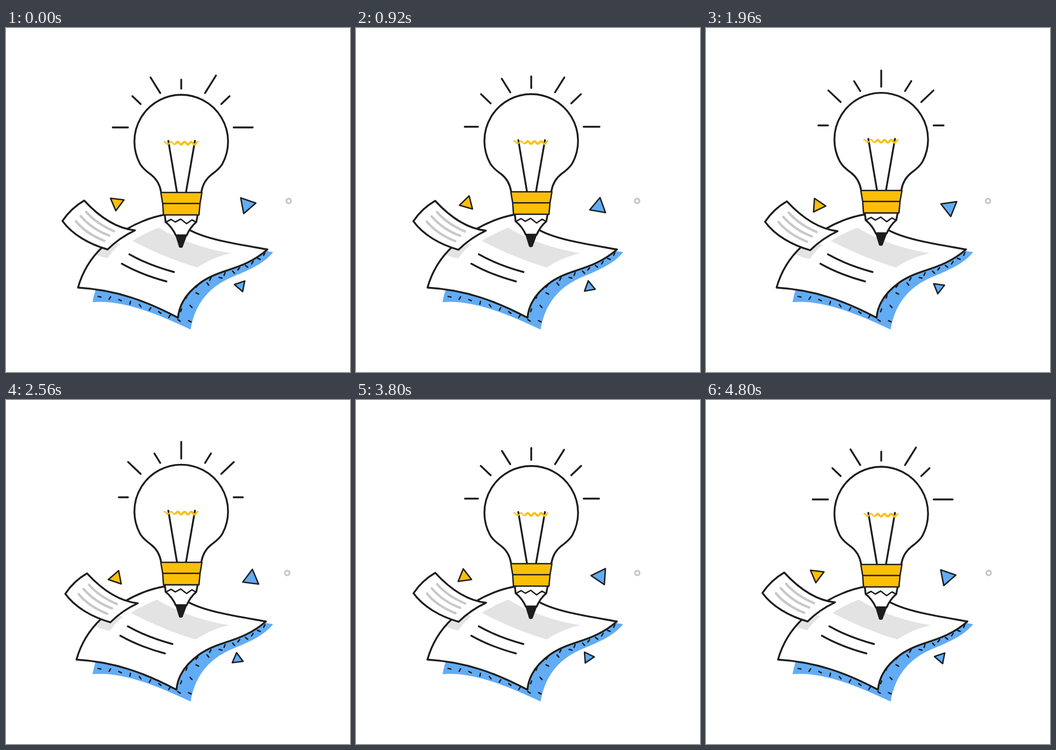
Write an HTML page that moves like this. It is 640x640 px and loops after 4840 ms.

```html
<!DOCTYPE html>
<html lang="en">
<head>
<meta charset="utf-8">
<title>Bright idea</title>
<style>
  html, body { margin: 0; width: 100%; height: 100%; overflow: hidden; background: #fff; }
  svg { display: block; width: 100%; height: 100%; }
  .line { fill: none; stroke: #1d1d1d; stroke-width: 3.4; stroke-linecap: round; stroke-linejoin: round; }
  .white { fill: #fff; }
  .thin { stroke-width: 2.6; }
  .blue { fill: #62acf5; }
  .gold { fill: #fbbf07; }
  .shade { fill: #e3e3e3; }
  .grey { fill: none; stroke: #c8c8c8; stroke-width: 4.4; stroke-linecap: round; }
  .glow { fill: none; stroke: #fbbf07; stroke-linecap: round; stroke-linejoin: round; }
</style>
</head>
<body>
<svg viewBox="0 0 640 640">
  <defs>
    <path id="sheet" d="M134 483C144 447 162 424 180 407C197 391 240 357 297 347C308 358 325 370 342 376C375 394 430 402 486.5 412C440 452 400 447 363 473C335 493 322 515 320 539C263 509 206 487 134 483Z"/>
    <clipPath id="inside"><use href="#sheet"/></clipPath>
    <path id="glass" d="M288.5 305C286 290 279 280 270 273C261 266.5 253.5 260.5 249 252A87 87 0 0 1 326 124.3"/>
    <path id="text" d="M229.5 421C255 435.5 283 446 312.5 454"/>
  </defs>

  <path class="blue" d="M169 480C166 489 163 499 161 510C220 505 285 534 343.5 561C352 508 383 478 425 461.5C456 448.5 481 437 497 417L478 414L320 480Z"/>
  <g id="dashes" class="line thin"></g>

  <g id="paper">
    <use href="#sheet" class="white"/>
    <path class="shade" d="M235 396C250 387 267 378 284 371.5C325 396 370 411 419 419C395 424 375 433 356 445.5C310 432 270 414 235 396Z"/>
    <g clip-path="url(#inside)">
      <path id="cast" class="shade" d="M156 416C168 423 179 427 189.5 428C196 417 203 410 213 402L190 395Z"/>
    </g>
    <use href="#sheet" class="line"/>
    <use href="#text" class="line"/>
    <use href="#text" class="line" x="-14" y="17.5"/>
  </g>

  <g id="note">
    <path class="line white" d="M145.5 321C130 330 115 344 105 359C123 384 155 402.500 189 412C204 397 221 385.500 240 376.500C202 372.500 170 347.500 145.500 321Z"/>
    <path class="grey" d="M149 342C163 358 182 370 201 378M139 350C155 368 172 379 192 386M130 359.500C145 378 163 388 183 396"/>
  </g>

  <g id="bulb">
    <path class="line white" d="M295.500 348L297 361C304.500 367 311 374.500 316 386H336C341 374.500 347 367 354 361L356.500 348"/>
    <path class="line thin" d="M297 361.500L307 356L315 361L325 355.500L336 364L346 357L354 361.500"/>
    <path fill="#1d1d1d" d="M314.500 384H337.500L328.500 408Q325.500 410 322 408Z"/>
    <use href="#glass" class="line white"/>
    <use href="#glass" class="line white" transform="matrix(-1 0 0 1 652 0)"/>
    <path class="line" d="M302 210L318 305M351.500 210L335 305"/>
    <path id="coil" class="glow" stroke-width="2.400"/>
    <path id="coilThick" class="glow" stroke-width="3.800"/>
    <path class="line thin gold" d="M288 306H364.500L361 326.500H291.500ZM291.500 326.500H361L359 347.800H293Z"/>
  </g>

  <g id="rays" class="line"></g>
  <g id="bits"></g>
  <circle id="ring" cy="321.800" r="4.300" fill="none" stroke="#c8c8c8" stroke-width="3.400"/>
</svg>
<script>
const $ = id => document.getElementById(id);
const STEP = 40, LOOP = 4840, TURN = 4800, RAD = Math.PI / 180;

const make = (tag, attrs) => {
  const el = document.createElementNS('http://www.w3.org/2000/svg', tag);
  for (const k in attrs) el.setAttribute(k, attrs[k]);
  return el;
};
const add = (id, tag, attrs) => $(id).appendChild(make(tag, attrs));
const move = (el, x, y, turn = 0) =>
  el.setAttribute('transform', `translate(${x} ${y}) rotate(${turn})`);

// Scatter short dashes along a guide, off to alternate sides by up to `spread`
let seed = 11;
const random = () => (seed = seed * 16807 % 2147483647) / 2147483647;

function scatter(d, count, spread) {
  const guide = make('path', { d }), length = guide.getTotalLength();
  for (let i = 0; i < count; i++) {
    const u = i / (count - 1);
    const p = guide.getPointAtLength(u * length);
    const off = (i % 2 ? -1 : 1) * spread * (1 - u) ** 1.5;
    const tilt = (i % 2 ? -55 : 35) + 50 * (random() - 0.5);
    const dash = add('dashes', 'path', { d: 'M-2.7 0H2.7' });
    move(dash, p.x + off, p.y + off * 0.4, tilt);
  }
}
scatter('M174 500C215 503 280 525 322 544', 9, 0);
scatter('M333 542C333 505 352 480 390 466C430 450 462 440 480.5 420.5', 16, 9);

// Filament
const wave = (from, to, mid) => {
  const pts = [];
  for (let x = from; x <= to; x++)
    pts.push(`${x} ${mid - 2.5 * Math.cos((x - 307) / 12.5 * 2 * Math.PI)}`);
  return 'M' + pts.join('L');
};
$('coil').setAttribute('d', wave(294, 357, 214));
$('coilThick').setAttribute('d', wave(316, 354, 214.4));

// Rays keep their slope while their length eases between two values
const rays = [];
const ray = (x, y, deg, from, to) => rays.push({
  y, from, to, x,
  dx: Math.cos(deg * RAD), dy: -Math.sin(deg * RAD),
  el: add('rays', 'line', { x1: x })
});
const pair = (left, right, y, deg, fromLeft, fromRight, to) => {
  ray(left, y, 180 - deg, fromLeft, to);
  ray(right, y, deg, fromRight, to);
};
pair(227, 423.5, 185, 0, 28.5, 35.5, 17);
pair(250.5, 400.5, 141.5, 43.5, 21.3, 21.3, 32.4);
pair(287, 370.3, 121, 58, 34.3, 38.5, 20.6);
ray(326, 113, 90, 17, 31.5);

// Equilateral triangles that spin around a pivot off their centre
const triangle = (r, start, off, offDeg) => [0, 120, 240].map(a => [
  off * Math.cos(offDeg * RAD) + r * Math.cos((start + a) * RAD),
  off * Math.sin(offDeg * RAD) + r * Math.sin((start + a) * RAD)
]).join(' ');

const bits = [
  { x: 205.6, y: 328.3, sway: 1.5, dir: 1, fill: 'gold', pts: triangle(14.6, -23, 3, -110) },
  { x: 452.1, y: 330.8, sway: -1.7, dir: -1, fill: 'blue', pts: triangle(17.2, -11, 3.1, 217) },
  { x: 433.4, y: 480.8, sway: 1.3, dir: 1, fill: 'blue', pts: triangle(11.7, 71, 2.2, -37) }
];
for (const b of bits)
  b.el = add('bits', 'polygon', { points: b.pts, class: 'line thin ' + b.fill });

function draw(ms) {
  const turn = ms / TURN, a = turn * 2 * Math.PI;
  const ease = (1 - Math.cos(a)) / 2, sway = Math.cos(3 * a);
  const lift = -4 * ease;

  move($('bulb'), 0, lift);
  move($('paper'), -2.9 * ease, 0);
  move($('cast'), 7.5 * ease, 1.6 * ease);
  move($('note'), 5.3 * ease, 1.6 * ease);

  for (const r of rays) {
    const len = r.from + (r.to - r.from) * ease;
    r.el.setAttribute('y1', r.y + lift);
    r.el.setAttribute('x2', r.x + r.dx * len);
    r.el.setAttribute('y2', r.y + lift + r.dy * len);
  }
  for (const b of bits) move(b.el, b.x + b.sway * sway, b.y, 360 * turn * b.dir);
  $('ring').setAttribute('cx', 524.4 + 1.5 * sway);
}

const start = performance.now();
function tick() {
  const t = (performance.now() - start) % LOOP;
  draw(Math.floor(t / STEP) * STEP);
  requestAnimationFrame(tick);
}
tick();
</script>
</body>
</html>
```
